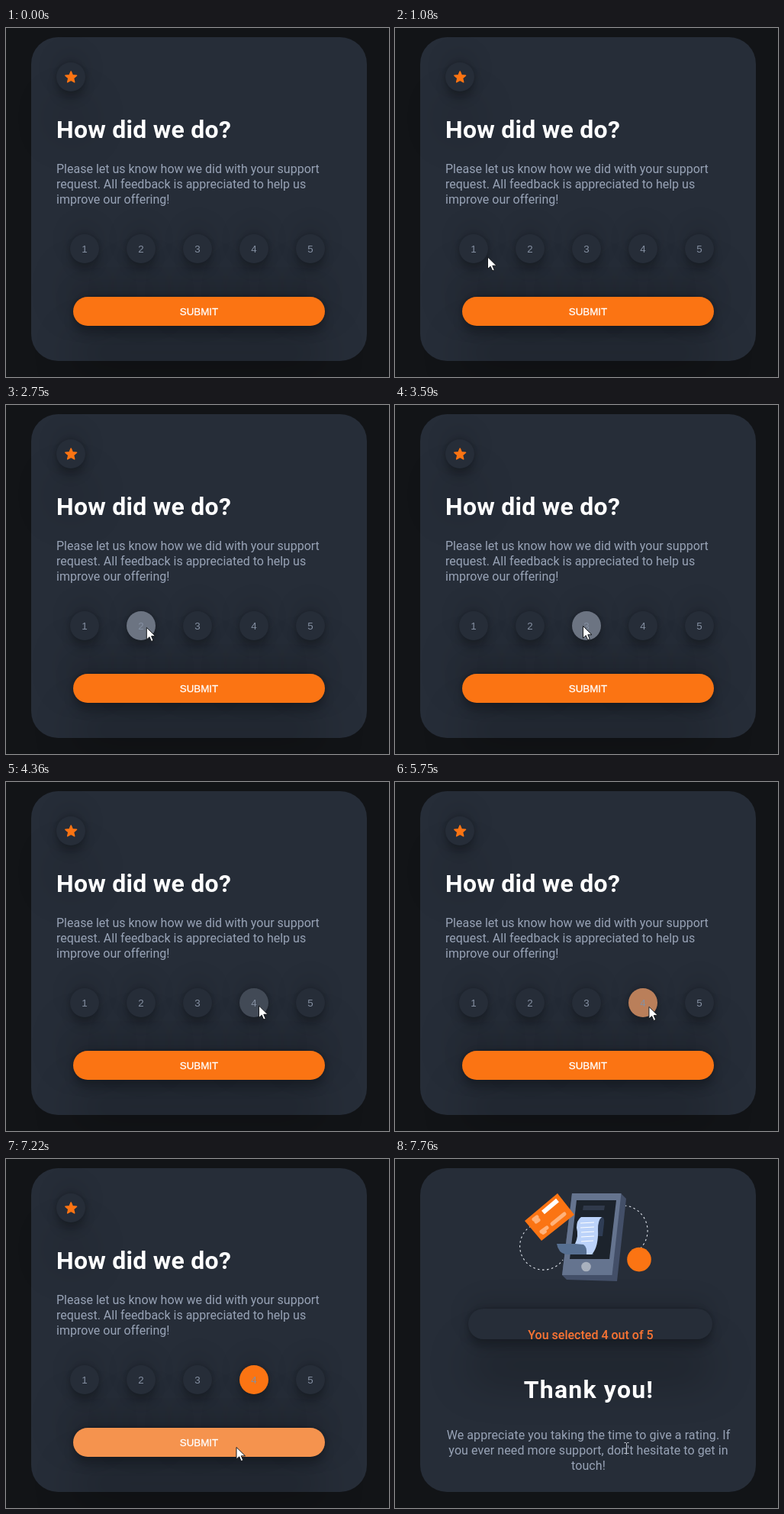
These frames come from a looping animation (502x457 px, 8 s). An HTML page:

```html
<!DOCTYPE html>
<html lang="en">
<head>
<meta charset="utf-8">
<title>Rating card</title>
<style>
  html, body { margin: 0; width: 100%; height: 100%; overflow: hidden; background: #121417; }
  #stage { position: relative; width: 502px; height: 457px; overflow: hidden; font-family: Roboto, sans-serif; }
  #stage div, svg { position: absolute; }
  svg { left: 0; top: 0; overflow: visible; }
  .card { left: 33px; top: 12px; width: 440px; height: 424px; border-radius: 35px; background: #262d38; }
  .view { left: 0; top: 0; width: 502px; height: 457px; }
  .raised {
    background: #262d38; border-radius: 20px;
    box-shadow: rgba(0,0,0,.25) 0 54px 55px, rgba(0,0,0,.12) 0 -12px 30px, rgba(0,0,0,.12) 0 4px 6px,
      rgba(0,0,0,.17) 0 12px 13px, rgba(0,0,0,.09) 0 -3px 5px;
  }
  .round { width: 38px; height: 38px; }
  .rate, .submit { font: 13.333px/39px "Liberation Sans", Arial, sans-serif; text-align: center; }
  .rate { top: 270px; color: #8590a2; }
  .submit {
    left: 88px; top: 352px; width: 330px; height: 38px;
    background: #fb7413; color: #fff; -webkit-text-stroke: .3px #fff;
  }
  .bar { left: 96px; top: 196px; width: 320px; height: 40px; }
  .title { font-size: 32px; font-weight: 700; fill: #fff; }
  .copy { font-size: 16px; fill: #98a3b6; }
  .score { font-size: 16px; font-weight: 500; fill: #fb7433; }
  .mid { text-anchor: middle; }
</style>
</head>
<body>
<div id="stage">
  <div class="card"></div>

  <div class="view" id="form">
    <div class="raised round" style="left:66px;top:45px"></div>
    <div id="rates"></div>
    <div class="raised submit" id="submit">SUBMIT</div>
    <svg width="502" height="457">
      <polygon id="star" fill="#fb7413" stroke="#fb7413" stroke-width="1.4" stroke-linejoin="round"/>
      <text class="title" x="66" y="143.5" letter-spacing=".25">How did we do?</text>
      <g class="copy">
        <text x="66" y="190">Please let us know how we did with your support</text>
        <text x="66" y="210">request. All feedback is appreciated to help us</text>
        <text x="66" y="230">improve our offering!</text>
      </g>
    </svg>
  </div>

  <div class="view" id="thanks">
    <div class="raised bar"></div>
    <svg width="502" height="457">
      <g fill="none" stroke="#dfe4ec" stroke-width="1.1" stroke-dasharray="2.5 3.5">
        <path d="M178 88A31 31 0 1 0 220 132"/>
        <path d="M301 61A33 33 0 0 1 322 116.6"/>
      </g>
      <circle cx="320" cy="131.6" r="15.8" fill="#fb7413"/>
      <path d="M232 45H296L303 52L291 160L225 158L219 152Z" fill="#434f68"/>
      <path d="M232 45H296.5L284.5 152H219Z" fill="#65748f"/>
      <path d="M238 54H290L281 131H229Z" fill="#1c232c"/>
      <path d="M247 61H275L274 67H246Z" fill="#303a4b"/>
      <path d="M262 76H272Q275 78 274 84L272 101H262Z" fill="#2f3d55"/>
      <circle cx="250.5" cy="141" r="6.3" fill="#a9b1be"/>
      <path d="M212 111H254L260 125H224Q214 123 212 111Z" fill="#566f91"/>
      <path d="M244 76H271Q266 80 266 92Q267 115 258 125H251Q252 115 247 112L236 111Q241 101 238 90Q238 80 244 76Z" fill="#bcd3fa"/>
      <path d="M243 84l18-1M243 90l18-1M244 96l17-1M244 102l17-1M244 108l16-1" stroke="#fff"/>
      <path d="M170 81L213 45L235 73L192 107Z" fill="#fb7413"/>
      <path d="M194 70L213 54" stroke="#fff" stroke-width="6"/>
      <g stroke="#ffb27a" stroke-linecap="round">
        <path d="M182 79l4-3M185 82l3-2" stroke-width="5"/>
        <path d="M192 95l7-5M206 85l16-13" stroke-width="5"/>
        <path d="M194 97l3-2" stroke-width="4"/>
      </g>
      <text class="score mid" x="256.5" y="236">You selected 4 out of 5</text>
      <text class="title mid" x="254" y="313" letter-spacing="1.2">Thank you!</text>
      <g class="copy mid" letter-spacing=".08">
        <text x="253.5" y="367">We appreciate you taking the time to give a rating. If</text>
        <text x="253.5" y="387">you ever need more support, don't hesitate to get in</text>
        <text x="253.5" y="407">touch!</text>
      </g>
    </svg>
  </div>

  <svg width="502" height="457">
    <path id="arrow" d="M.5 .5V16.2L4.2 12.8L6.7 18.6L9.3 17.5L6.8 11.8H12Z" fill="#fff" stroke="#15181c" stroke-width="1"/>
    <path id="beam" d="M300.5 371.5h2l1 1l1-1h2M303.5 372v13M300.5 385.5h2l1-1l1 1h2" fill="none" stroke="#c5cad2"/>
  </svg>
</div>
<script>
const LOOP = 8000;
const BASE = [38, 45, 56], HOVER = [108, 116, 130], ORANGE = [251, 116, 19], LIGHT = [245, 147, 78];
const $ = id => document.getElementById(id);

const rates = [1, 2, 3, 4, 5].map(n => {
  const el = document.createElement('div');
  el.className = 'raised round rate';
  el.style.left = 84 + (n - 1) * 74 + 'px';
  el.textContent = n;
  $('rates').append(el);
  return el;
});

$('star').setAttribute('points', Array.from({ length: 10 }, (_, i) => {
  const r = i % 2 ? 3.6 : 7.8, a = i * Math.PI / 5;
  return [85.2 + r * Math.sin(a), 64.7 - r * Math.cos(a)].map(v => v.toFixed(2));
}).join(' '));

// Each track is a list of [time, value...] steps.
const cursorTrack = [
  [520, 302, 432], [1220, 100, 284], [1570, 100, 284], [1980, 166, 317], [2400, 182, 291],
  [2680, 182, 291], [3380, 246, 289], [3800, 246, 289], [4360, 331, 292.5],
  [5480, 332, 293], [5750, 332.5, 294], [5960, 334, 303], [6170, 334, 303], [6870, 301.5, 377]
];
const rateTracks = [
  [[1290, ...BASE], [1500, ...HOVER], [1640, ...HOVER], [1920, ...BASE]],
  [[2420, ...BASE], [2540, ...HOVER], [2750, ...HOVER], [3030, ...BASE]],
  [[3450, ...BASE], [3590, ...HOVER], [3870, ...HOVER], [4150, ...BASE]],
  [[4220, ...BASE], [4540, ...HOVER], [5410, ...HOVER], [5750, 193, 128, 86],
   [5960, 233, 119, 40], [6240, 233, 119, 40], [6520, ...ORANGE]]
];
const submitTrack = [[6520, ...ORANGE], [6870, ...LIGHT]];
const fadeTrack = [[7290, 0], [7570, 1]];

function at(track, t) {
  const next = track.findIndex(step => step[0] > t);
  if (next === 0) return track[0].slice(1);
  if (next < 0) return track[track.length - 1].slice(1);
  const [t0, ...from] = track[next - 1], [t1, ...to] = track[next];
  const p = (t - t0) / (t1 - t0), eased = p * p * (3 - 2 * p);
  return from.map((v, i) => v + (to[i] - v) * eased);
}

function tick(t) {
  const phase = t < 1700 ? 30 : t < 5900 ? 20 : 10;
  return t - (t - phase + 70) % 70;
}

const rgb = c => `rgb(${c.map(Math.round)})`;

function draw(now) {
  const t = tick(now % LOOP);
  const [x, y] = at(cursorTrack, t);
  const [fade] = at(fadeTrack, t);
  rateTracks.forEach((track, i) => rates[i].style.background = rgb(at(track, t)));
  $('submit').style.background = rgb(at(submitTrack, t));
  $('form').style.opacity = 1 - fade;
  $('thanks').style.opacity = fade;
  $('arrow').setAttribute('transform', `translate(${x} ${y})`);
  $('arrow').style.display = t >= 590 && fade < 1 ? '' : 'none';
  $('beam').style.display = fade < 1 ? 'none' : '';
}

const start = performance.now();
(function loop() {
  draw(performance.now() - start);
  requestAnimationFrame(loop);
})();
</script>
</body>
</html>
```
